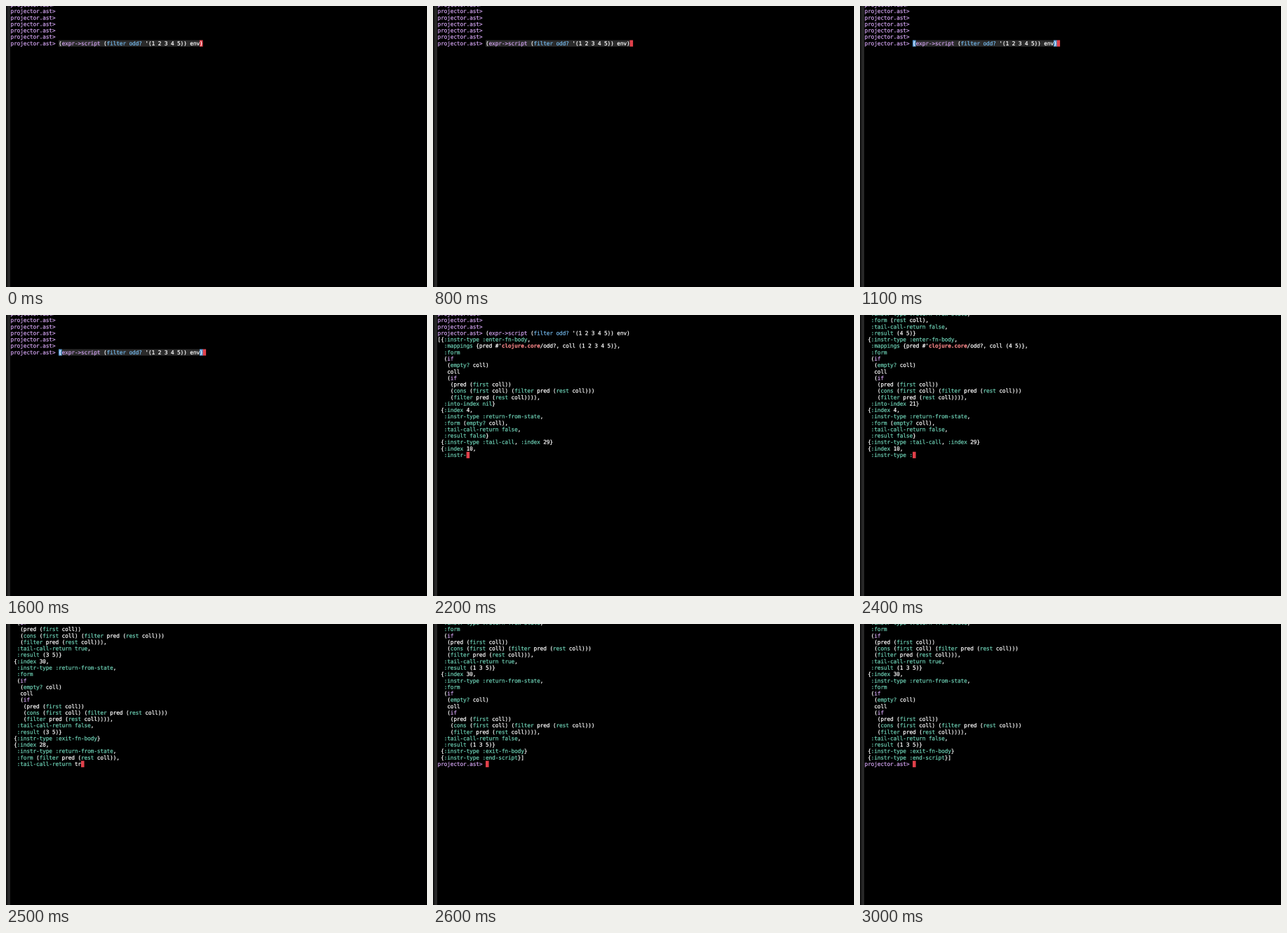
An HTML page with a canvas that plays this animation: 600 px wide and 400 px high, repeating every 6 s.

```html
<!DOCTYPE html>
<html lang="en">
<head>
<meta charset="utf-8">
<title>REPL session</title>
<style>
  html, body { margin: 0; width: 100%; height: 100%; overflow: hidden; background: #000; }
  canvas { display: block; width: 600px; height: 400px; }
</style>
</head>
<body>
<canvas id="screen" width="1200" height="800"></canvas>
<script>
const LOOP = 6000;
const CELL_W = 4.567, CELL_H = 9.133, LEFT = 6.5, TOP = 2.95, BASELINE = 7.25;
const LAST_ROW = 21;
const FONT = '7.83px "DejaVu Sans Mono", monospace';

const WHITE = '#ffffff', PURPLE = '#cc9fea', TEAL = '#6bcdb2', BLUE = '#6fb2e4';
const RED = '#ea7f80', CURSOR = '#e0404a', INPUT_BG = '#2a2a2a', MATCH_BG = '#5a9bd5';

const PROMPT = 'projector.ast> ';
const INPUT = PROMPT + "(expr->script (filter odd? '(1 2 3 4 5)) env)";
const HISTORY = Array(6).fill(PROMPT);

// Each rule pairs a pattern with its colour.
const INPUT_RULES = [
  [/^projector\.ast>/g, PURPLE],
  [/expr->script/g, PURPLE],
  [/filter|odd\?/g, BLUE],
];
const OUTPUT_RULES = [
  [/\b(first|rest|cons|filter|true|false|nil|empty\?)/g, TEAL],
  [/\bif\b/g, PURPLE],
  [/clojure\.core/g, RED],
  [/:[\w-]*/g, TEAL],
];

// The printed result: an evaluation trace of the filter call.
const innerIf = pad => [
  '(if',
  ' (pred (first coll))',
  ' (cons (first coll) (filter pred (rest coll)))',
  ' (filter pred (rest coll)))',
].map(line => '\n' + pad + line).join('');
const outerIf = '\n  (if\n   (empty? coll)\n   coll' + innerIf('   ') + ')';

const show = list => `(${list.join(' ')})`;
const jump = index => `{:instr-type :tail-call, :index ${index}}`;
const enter = (list, into) =>
  `{:instr-type :enter-fn-body,\n  :mappings {pred #'clojure.core/odd?, coll ${show(list)}},` +
  `\n  :form${outerIf},\n  :into-index ${into}}`;
const returns = (index, form, result, tail = false) =>
  `{:index ${index},\n  :instr-type :return-from-state,\n  :form${form},` +
  `\n  :tail-call-return ${tail},\n  :result ${result}}`;

function trace(list, into, steps) {
  const [first, ...rest] = list;
  let kept = [];
  steps.push(enter(list, into), returns(4, ' (empty? coll)', !list.length));
  if (list.length) {
    const odd = first % 2 === 1;
    const target = odd ? 21 : 28;
    steps.push(jump(29), returns(10, ' (first coll)', first),
      returns(11, ' (pred (first coll))', odd), jump(odd ? 22 : 28));
    if (odd) steps.push(returns(15, ' (first coll)', first));
    steps.push(returns(target - 1, ' (rest coll)', show(rest)));
    kept = trace(rest, target, steps);
    steps.push(returns(target, ' (filter pred (rest coll))', show(kept), !odd));
    if (odd) {
      kept = [first, ...kept];
      steps.push(returns(22, ' (cons (first coll) (filter pred (rest coll)))', show(kept), true));
    }
    steps.push(returns(29, innerIf('  '), show(kept), true));
  } else {
    steps.push(jump(5), returns(5, ' coll', '()', true));
  }
  steps.push(returns(30, outerIf, show(kept)), '{:instr-type :exit-fn-body}');
  return kept;
}

const steps = [];
trace([1, 2, 3, 4, 5], 'nil', steps);
steps.push('{:instr-type :end-script}');
const OUTPUT = '[' + steps.join('\n ') + ']\n' + PROMPT;

// Length of output up to the end of the last part, searching in order.
const upTo = (...parts) =>
  parts.reduce((at, part) => OUTPUT.indexOf(part, at) + part.length, 0);

const firstCall = upTo('coll (1 2 3 4 5)', 'clojure.cor');
const TIMELINE = [
  { at: 0, cursor: 59 },
  { at: 800, cursor: 60 },
  { at: 900, cursor: 60, match: true },
  { at: 1900, shown: 0 },
  { at: 2000, shown: Math.round(firstCall * 0.05) },
  { at: 2100, shown: Math.round(firstCall * 0.18) },
  { at: 2200, shown: Math.round(firstCall * 0.45) },
  { at: 2300, shown: firstCall },
  { at: 2400, shown: upTo('coll (4 5)', ':index 10', 'type :') },
  { at: 2500, shown: upTo('(3 5)}\n {:instr-type :exit', 'return tr') },
  { at: 2600, shown: OUTPUT.length },
];

const ctx = document.getElementById('screen').getContext('2d', { alpha: false });
ctx.scale(2, 2);

function fillCells(row, col, count, color) {
  ctx.fillStyle = color;
  ctx.fillRect(LEFT + col * CELL_W, TOP + row * CELL_H, count * CELL_W, CELL_H);
}

// A hairline outline gives the glyphs their slightly heavy weight.
function drawChar(char, col, row, color) {
  const x = LEFT + col * CELL_W, y = TOP + row * CELL_H + BASELINE;
  ctx.font = color === RED ? 'bold ' + FONT : FONT;
  ctx.fillStyle = ctx.strokeStyle = color;
  ctx.fillText(char, x, y);
  ctx.strokeText(char, x, y);
}

function drawLine(text, row) {
  const colors = Array(text.length).fill(WHITE);
  const rules = text.startsWith('projector') ? INPUT_RULES : OUTPUT_RULES;
  for (const [pattern, color] of rules)
    for (const hit of text.matchAll(pattern))
      colors.fill(color, hit.index, hit.index + hit[0].length);
  colors.forEach((color, col) => drawChar(text[col], col, row, color));
}

function drawWindow() {
  ctx.fillStyle = '#000';
  ctx.fillRect(0, 0, 600, 400);
  ctx.fillStyle = '#101010';
  ctx.fillRect(0, 0, 2, 400);
  ctx.fillStyle = '#272727';
  ctx.fillRect(2, 0, 4, 400);
}

function draw({ cursor, match, shown }) {
  const typing = shown === undefined;
  const lines = [...HISTORY, INPUT];
  if (!typing) lines.push(...OUTPUT.slice(0, shown).split('\n'));
  const last = lines.length - 1;
  const shift = 1 + Math.max(0, last - 1 - LAST_ROW);
  const endRow = last - shift;

  ctx.textRendering = 'geometricPrecision';
  ctx.lineWidth = 0.22;
  ctx.lineJoin = 'round';
  drawWindow();
  if (typing) fillCells(endRow, PROMPT.length, INPUT.length - PROMPT.length, INPUT_BG);
  if (match) [PROMPT.length, INPUT.length - 1].forEach(col => fillCells(endRow, col, 1, MATCH_BG));
  fillCells(endRow, typing ? cursor : lines[last].length, 1, CURSOR);
  lines.forEach((line, i) => {
    if (i - shift >= -1) drawLine(line, i - shift);
  });
}

const start = performance.now();
let current;
function tick() {
  const time = (performance.now() - start) % LOOP;
  const state = TIMELINE.findLast(step => step.at <= time);
  if (state !== current) draw(current = state);
  requestAnimationFrame(tick);
}
tick();
</script>
</body>
</html>
```
